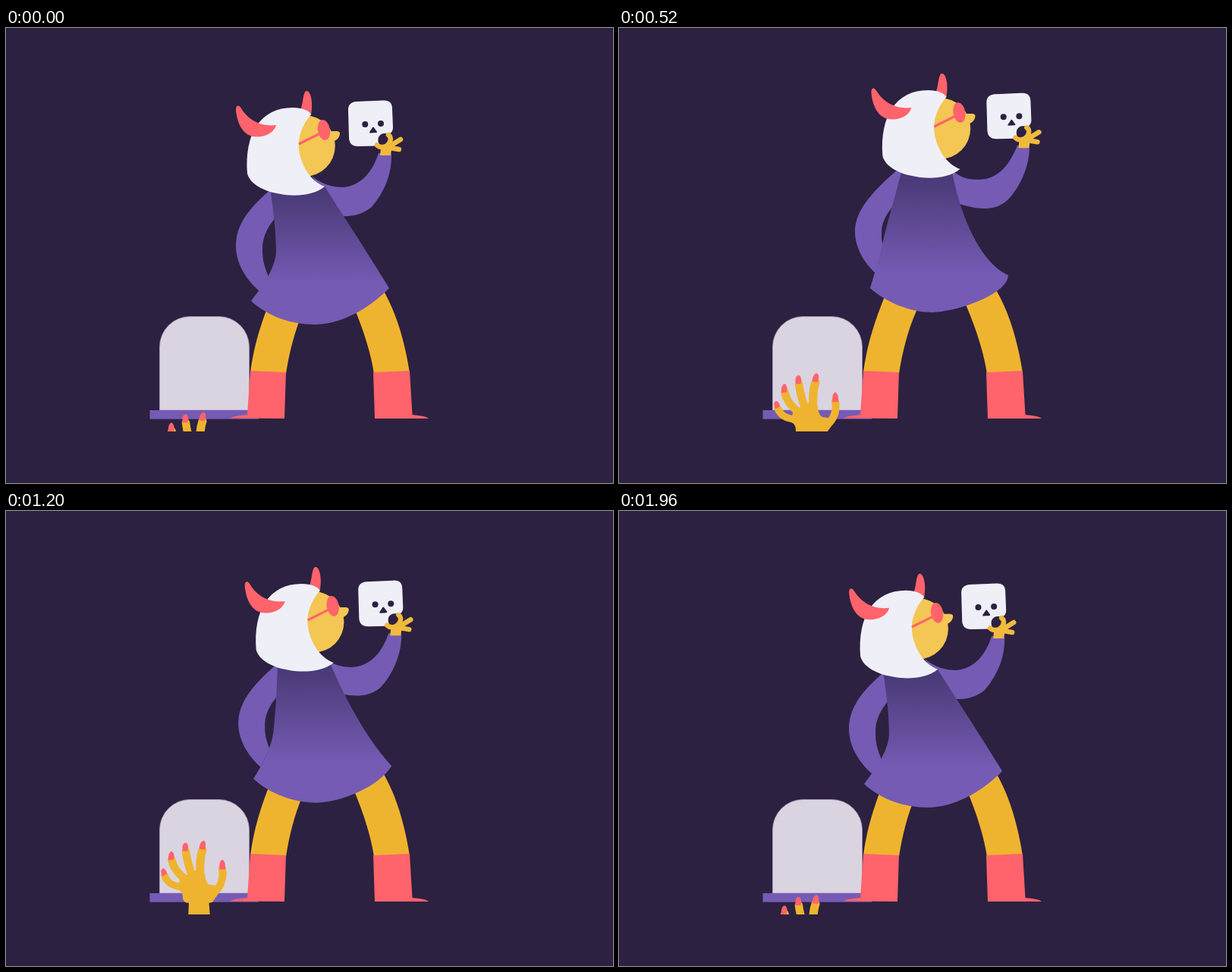
An HTML page that plays this animation: 800 by 600 pixels, repeating every 2000 ms.

```html
<!DOCTYPE html>
<html lang="en">
<head>
<meta charset="utf-8">
<title>Viking and the rising hand</title>
<style>
html, body { margin: 0; width: 100%; height: 100%; overflow: hidden; background: #2c2140; }
svg { display: block; width: 100vw; height: 100vh; }
.purple { fill: #755bb4; }
.gold { fill: #efb42f; }
.coral { fill: #ff636c; }
.white { fill: #efeff8; }
.dark { fill: #2c2140; }
.face { fill: #f4c653; }
.finger { fill: none; stroke: #efb42f; stroke-linecap: round; stroke-linejoin: round; }
.grip { fill: none; stroke: #f0ba3e; stroke-linecap: round; stroke-width: 6.5; }
</style>
</head>
<body>
<svg viewBox="0 0 800 600" xmlns="http://www.w3.org/2000/svg">
  <defs>
    <linearGradient id="shade" gradientUnits="userSpaceOnUse" x1="0" x2="0" y1="218" y2="338">
      <stop offset="0" stop-color="#4a3a77"/>
      <stop offset="1" stop-color="#755bb4"/>
    </linearGradient>
    <clipPath id="ground"><rect width="800" height="532"/></clipPath>
  </defs>

  <path d="M202.5 504V420.5A40 40 0 0 1 242.5 380.5H280.5A40 40 0 0 1 320.5 420.5V504Z" fill="#dad4e1" stroke="#a994b4" stroke-width=".8"/>
  <rect class="purple" x="189.5" y="504" width="143.5" height="11.7"/>

  <g clip-path="url(#ground)">
    <g id="hand">
      <path class="gold" d="M230 470L250 460L262 464C263 477 267 480 271 479L284 482C279 494 274 498 273 501C271 503 268 503 267.500 503L270 534H239.500L241 503C236 503 234 501 233 497C233 491 232 488 226 485Z"/>
      <path class="finger" stroke-width="9.500" d="M209 467C213 478 222 482 237 482"/>
      <path class="finger" stroke-width="10.500" d="M218.500 446C221 460 230 466 242 478"/>
      <path class="finger" stroke-width="10.500" d="M237 435C239 452 244 462 248 478"/>
      <path class="finger" stroke-width="11" d="M259 433C254 447 256 462 256 478"/>
      <g id="thumb">
        <path class="finger" stroke-width="10" d="M285 458C288 473 281 485 271 492"/>
        <path class="coral" d="M281.500 459C280.500 452 282 447 285 446C288 447 289.500 452 289 459Z"/>
      </g>
      <path class="coral" d="M206 468C203.500 463 204 459 206.500 457.500C210 458 212 461 212 465Z"/>
      <path class="coral" d="M214 447C213.500 440 215 436 218 435C221 436 222.500 440 221 446Z"/>
      <path class="coral" d="M233 435C231.500 429 233 424 237 423.500C240 425 241 429 239.500 435Z"/>
      <path class="coral" d="M255 432C254.500 426 257 421.500 261 421C264 423 263.500 428 262 433Z"/>
    </g>
  </g>

  <path id="backArm" class="purple"/>
  <path id="frontArm" class="purple"/>

  <path class="gold" d="M322 455C326 425 333 397 349 357L365 330L410 340L392 373C380 400 373 430 369 456Z"/>
  <path class="gold" d="M485 456C481 430 472 400 458 367L450 340L492 336L499 349C515 378 526 415 532 455Z"/>
  <path class="coral" d="M322 452L369 454L367 515L296 514.500C298 512 309 511 318 510Z"/>
  <path class="coral" d="M484 454L532 452L535.500 510C544 511 554 512 557 515L486 515Z"/>

  <path id="dress" fill="url(#shade)"/>

  <g id="skull">
    <path class="white" d="M451 109C450.500 101 455 97.500 462 97L497 95.500C505 95 509 99 509 106L510 131C510 137 507 139.500 503 139.500C497 138 493 140 491 144C489.500 149 491 152 493 154.500Q491 155.500 488 155.500L464 156C456 156 452 152 452 144Z"/>
    <circle class="dark" cx="473.300" cy="127" r="4"/>
    <circle class="dark" cx="494" cy="126" r="4"/>
    <path class="dark" stroke="#2c2140" stroke-width="2" stroke-linejoin="round" d="M484 131.500L480 137.500L488 137Z"/>
    <path fill="#f0ba3e" d="M493 168L494 158L507 154L508 161L507 168Z"/>
    <path class="grip" d="M489 154.500C493 158.500 501 158 505 152C508 147 507 143 504 141"/>
    <path class="grip" d="M507 155L520 147M506 158L518 160"/>
  </g>

  <g id="head">
    <path class="coral" d="M396 83C400 82 404 92 403 106L402 115L388 108C392 100 391 84 396 83Z"/>
    <circle class="face" cx="393.500" cy="155.500" r="40.300"/>
    <path class="face" d="M420 136H436C441 136 441 140 438 145C435 149 431 150 424 150Z"/>
    <path class="white" d="M318 192C314 140 335 105 378 105C390 105 400 109 402 114C390 128 384 145 386 160C389 183 403 203 420 209C405 222 378 222 362 219C342 216 322 207 318 192Z"/>
    <path d="M386 153L414 139" stroke="#ff636c" stroke-width="3.200"/>
    <ellipse class="coral" cx="419" cy="134.500" rx="8" ry="13.500" transform="rotate(-10 419 134.500)"/>
    <path class="coral" d="M303 108C305 130 315 143.500 330 143.500C345 143.500 354 136 356 128C340 130 322 125 310 106C307 101 303 101 303 108Z"/>
  </g>
</svg>
<script>
const LOOP = 2000, STEP = 40, SWAY = 500, PEAK = 920, RISE = 86;
const el = id => document.getElementById(id);

// Each shape: leaning back, leaning forward
const poses = {
  backArm: [
    'M350 212C322 236 303 258 303 287C303 312 318 333 334 347L347 330C339 312 338 303 338 291C338 275 345 262 356 249L360 212Z',
    'M368 186C336 214 311 240 311 268C311 290 324 311 338 323L348 288C346 282 346 276 346 270C346 258 351 246 363 233L380 190Z'
  ],
  frontArm: [
    'M402 194C415 206 430 210 444 210C468 208 483 190 491 165L508 166C509 190 500 215 482 236C470 246 456 249 440 248L410 205Z',
    'M438 186C447 196 458 200 474 200C500 200 515 180 525 155L541 157C541 182 529 210 512 227C495 242 472 240 446 231L430 195Z'
  ],
  dress: [
    'M348 210C352 240 356 268 356 295C355 312 345 332 323 360C345 380 375 391 407 391C440 391 478 371 505 343C478 299 448 253 420 209Z',
    'M373 186C365 220 355 250 347 285C343 303 338 320 331 343C352 362 385 375 413 375C445 374 512 352 513 326C478 310 452 255 439 190Z'
  ]
};

const mix = (a, b, k) => a + (b - a) * k;

function morph([from, to], k) {
  const ends = to.match(/\d+/g);
  let i = 0;
  return from.replace(/\d+/g, n => mix(+n, +ends[i++], k).toFixed(2) + ' ');
}

const smooth = u => u * u * (3 - 2 * u);

// Same curve as cubic-bezier(.5, 0, .35, 1)
function ease(u) {
  let lo = 0, hi = 1;
  for (let i = 0; i < 24; i++) {
    const s = (lo + hi) / 2, r = 1 - s;
    const x = 1.5 * s * r * r + 1.95 * s * s * r + s * s * s;
    // second handle sits at .35, so its weight is 1.05
    if (x - 0.9 * s * s * r < u) lo = s; else hi = s;
  }
  return smooth(lo);
}

const move = (id, x, y) => el(id).setAttribute('transform', `translate(${x} ${y})`);

function draw(t) {
  const phase = t % (2 * SWAY);
  const k = phase < SWAY ? ease(phase / SWAY) : 1 - ease(phase / SWAY - 1);
  for (const id in poses) el(id).setAttribute('d', morph(poses[id], k));
  el('shade').setAttribute('y1', 218 - 20 * k);
  el('shade').setAttribute('y2', 338 - 14 * k);
  move('head', 29.5 * k, -23 * k);
  move('skull', 33.5 * k, -9.7 * k);

  const up = RISE * (t < PEAK ? smooth(t / PEAK) : 1 - smooth((t - PEAK) / (LOOP - PEAK)));
  move('hand', 0, RISE - 0.5 - up);
  const curl = 30 * Math.max(0, 1 - up / 40);
  el('thumb').setAttribute('transform', `rotate(${curl} 285 460)`);
}

const start = performance.now();
function tick() {
  const t = (performance.now() - start) % LOOP;
  draw(Math.floor(t / STEP) * STEP);
  requestAnimationFrame(tick);
}
tick();
</script>
</body>
</html>
```
